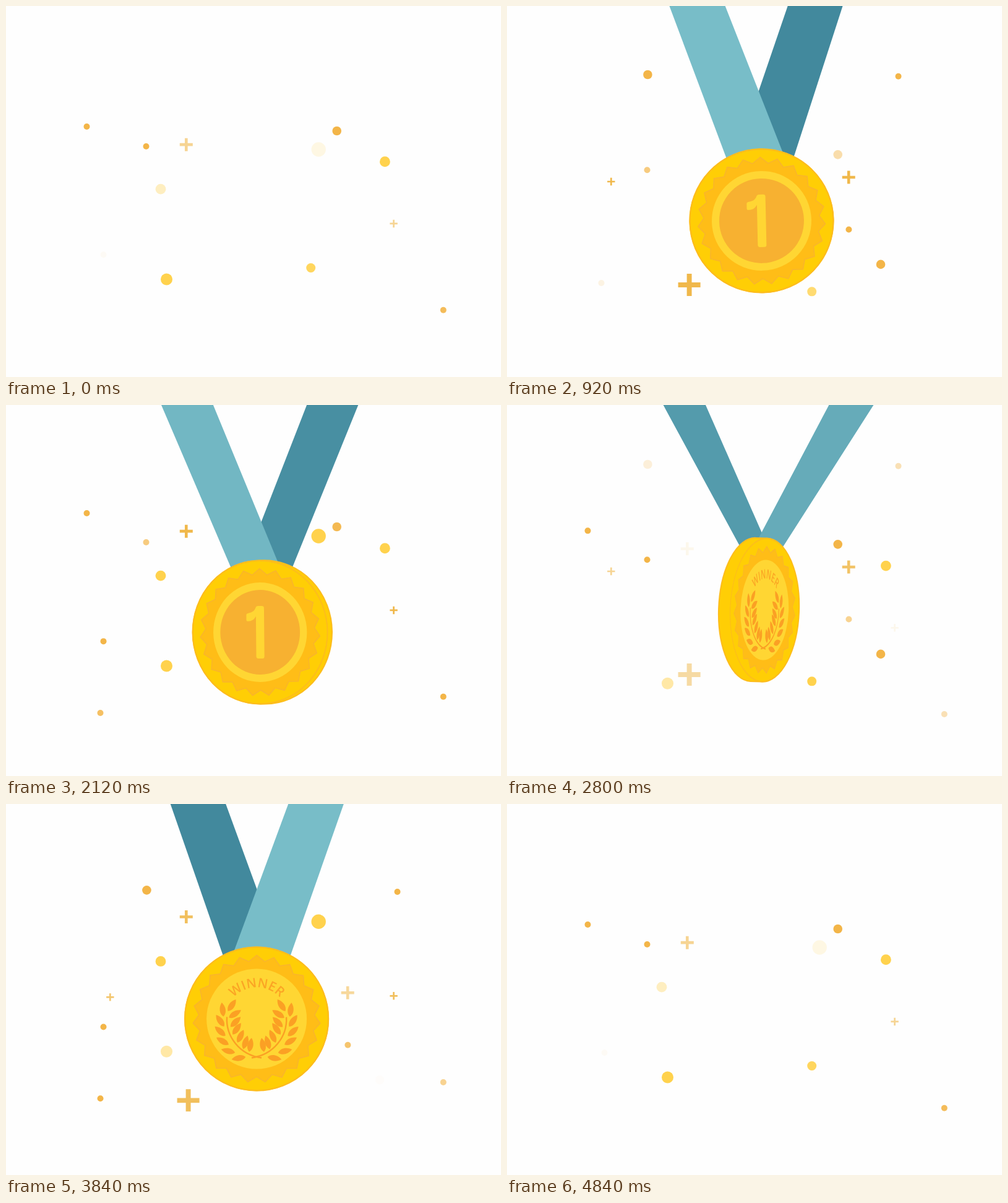
Animation of 800x600 px, one loop 4.88 s. Source, as an HTML page:

```html
<!DOCTYPE html>
<html lang="en">
<head>
<meta charset="utf-8">
<title>Winner medal</title>
<style>
  html, body { margin: 0; width: 100%; height: 100%; overflow: hidden; background: #fefefe; }
  svg { display: block; width: 100%; height: 100%; }
  text { font: 600 21px "Open Sans", "Noto Sans", sans-serif; fill: #fba524; text-anchor: middle; }
</style>
</head>
<body>
<svg viewBox="0 0 800 600">
  <defs>
    <path id="arc" d="M-51 0A51 51 0 0 1 51 0"/>
    <path id="leaf" d="M-11.5 0C-6-6.5 4-6 11.5 0C4 6-6 6.5-11.5 0Z"/>
  </defs>
  <g id="sparks"></g>
  <g id="medal">
    <g id="ribbons"><path id="left"/><path id="right"/></g>
    <path id="rim" fill="#ffce05" stroke="#fdbd1c" stroke-width="2.2"/>
    <g id="front">
      <circle r="80.5" fill="#ffd633"/>
      <circle r="68.5" fill="#f7b131"/>
      <path fill="#ffd633" d="M-7-26C-10-20-15-18-20-18Q-23.5-17.500-23.500-20V-28Q-23.500-30.500-20-31
        C-13-32-9-35-7.500-39.500Q-6.500-42.500-3-42.500H3Q7-42.500 7-39V39Q7 42.500 3.500 42.500H-3.500Q-7 42.500-7 39Z"/>
    </g>
    <g id="back">
      <circle r="81" fill="#ffd633"/>
      <text><textPath href="#arc" startOffset="50%">WINNER</textPath></text>
      <g id="wreath" fill="#fba024"></g>
    </g>
  </g>
</svg>
<script>
const NS = "http://www.w3.org/2000/svg";
const $ = id => document.getElementById(id);
const set = (el, attrs) => {
  for (const k in attrs) el.setAttribute(k, attrs[k]);
  return el;
};
const add = (parent, tag, attrs) => parent.appendChild(set(document.createElementNS(NS, tag), attrs));

const LOOP = 4880, STEP = 40, CYCLE = 4840, REPEAT = 2240;
const LIFE = 1600, FADE = 400;
const ORANGE = "#f3b548", YELLOW = "#ffd24d";

// Dots: x, y at birth, birth time, radius
const orangeDots = [
  [130.5, 156.7, 1680, 5], [226.5, 210.3, -400, 5], [534.7, 181.2, -500, 7.3],
  [157.5, 336.3, 1020, 5], [706.8, 440, 1360, 5], [152.5, 445.5, 860, 5],
  [227.4, 92.7, 480, 7.3], [632.5, 92, 400, 5], [552.4, 336.5, 320, 5], [604, 380, 10, 7.3]
];
const yellowDots = [
  [612.4, 213.4, 1680, 8.4], [505.2, 167.8, 1060, 11.7], [250, 235.3, 1140, 8.4],
  [259.5, 392, 1400, 9.5], [492.7, 408.5, -360, 7.5]
];
// Crosses: x, y at birth, birth time, half length
const crosses = [
  [291.3, 167.5, 1240, 10.5], [626.6, 295.3, 1240, 6.2], [168.3, 259, 320, 6.2],
  [552.2, 247.8, 220, 10.5], [294.6, 427.7, 360, 18]
];

const sparks = [];
const addDots = (list, fill) => list.forEach(([x, y, born, r]) =>
  sparks.push({ x, y, born, el: add($("sparks"), "circle", { r, fill }) }));
addDots(orangeDots, ORANGE);
addDots(yellowDots, YELLOW);
crosses.forEach(([x, y, born, h]) => sparks.push({ x, y, born, el: add($("sparks"), "path", {
  d: `M${-h} 0H${h}M0 ${-h}V${h}`, fill: "none", stroke: "#f0b84b", "stroke-width": h * 0.44
}) }));

// Shared disc and toothed seal under each face's own artwork
const TEETH = 23;
const seal = Array.from({ length: TEETH * 2 }, (_, i) => {
  const a = i * Math.PI / TEETH, r = i % 2 ? 93.5 : 103;
  return (r * Math.sin(a)).toFixed(2) + "," + (-r * Math.cos(a)).toFixed(2);
}).join(" ");
for (const id of ["front", "back"]) {
  const face = $(id), first = face.firstElementChild;
  const disc = add(face, "circle", { r: 115.8, fill: "#ffce05", stroke: "#fdbd1c", "stroke-width": 2.2 });
  const star = add(face, "polygon", { points: seal, fill: "#ffbd17", stroke: "#f9b52c", "stroke-width": 1.6 });
  face.insertBefore(disc, first);
  face.insertBefore(star, first);
}

// Leaves of the left branch: x, y, direction of the tip
const leaves = [
  [-55, -15, -97], [-59, 3, -125], [-59, 20, -138], [-55, 36, -150], [-46, 52, -167], [-29, 63.5, 170],
  [-40, -22, -56], [-35, -8, -32], [-34, 5, -45], [-32, 16, -54], [-26, 28, -64], [-18, 38, -72], [-10, 42, -80]
];
for (const side of [1, -1]) {
  const branch = add($("wreath"), "g", { transform: `scale(${side} 1)` });
  add(branch, "path", { d: "M-48-3C-50 28-28 58 8 63", fill: "none", stroke: "#fba024", "stroke-width": 2.4 });
  leaves.forEach(([x, y, a]) => add(branch, "use", { href: "#leaf", transform: `translate(${x} ${y}) rotate(${a})` }));
}

const clamp = v => Math.min(1, Math.max(0, v));
const mix = (a, b, k) => a + (b - a) * k;
const wave = k => (1 - Math.cos(Math.PI * k)) / 2;
const easeOut = k => 1 - (1 - k) ** 3;
const easeIn = k => k ** 3;

// Pose: time, pivot x, drop, tilt, easing towards the next pose
const poses = [
  [0, 882, -420, -50, easeOut],
  [520, 402, 0, 4, wave],
  [920, 402, 0, -1.3, wave],
  [1560, 402, 0, 1.35, wave],
  [1740, 403, 0, 1, wave],
  [2120, 410.3, 20, -0.55, wave],
  [2800, 422, -16, 2.05, wave],
  [3320, 408, 3, -0.6, wave],
  [3840, 405.8, 0, 0.1, wave],
  [4380, 403, 0, -0.6, easeIn],
  [4840, -78, -420, 50, easeIn]
];
const PIVOT_Y = -70, MEDAL_Y = 347.5, R = 116;

function poseAt(t) {
  let i = 0;
  while (i < poses.length - 2 && t >= poses[i + 1][0]) i++;
  const a = poses[i], b = poses[i + 1];
  const k = a[4](clamp((t - a[0]) / (b[0] - a[0])));
  return [1, 2, 3].map(n => mix(a[n], b[n], k));
}

const LIGHT = [120, 189, 200], DARK = [66, 137, 157];
const blend = k => `rgb(${LIGHT.map((c, i) => Math.round(mix(c, DARK[i], k)))})`;

function drawRibbons(s, turn) {
  const grow = (base, a, b) => base + a * s + b * s * s;
  const inner = y => grow(50.5, 40.6, 27.6) - grow(0.367, 0.075, 0.066) * y;
  const outer = y => grow(140, 23.2, 24.5) - grow(0.349, 0.149, 0.142) * y;
  const top = -400, end = 245;
  const strip = side => [[outer, top], [inner, top], [inner, end], [outer, end]]
    .map(([edge, y], i) => (i ? "L" : "M") + (side * edge(y)).toFixed(2) + " " + y).join("") + "Z";
  set($("left"), { d: strip(-1), fill: blend(turn) });
  set($("right"), { d: strip(1), fill: blend(1 - turn) });
  const upper = turn < 0.5 ? $("left") : $("right");
  if ($("ribbons").lastElementChild !== upper) $("ribbons").append(upper);
}

function drawMedal(t) {
  const [x, drop, tilt] = poseAt(t);
  const turn = wave(clamp((t - 1740) / 1757));
  const yaw = turn * Math.PI;
  const s = Math.sin(yaw), c = Math.abs(Math.cos(yaw));
  const h = 10.5 * s, rx = Math.max(0.5, R * c);
  set($("medal"), { transform: `translate(${x} ${drop}) rotate(${tilt} 0 ${PIVOT_Y})` });
  drawRibbons(s, turn);
  set($("rim"), {
    transform: `translate(0 ${MEDAL_Y})`,
    d: `M${-h} ${-R}H${h}A${rx} ${R} 0 0 1 ${h} ${R}H${-h}A${rx} ${R} 0 0 1 ${-h} ${-R}Z`
  });
  const isFront = turn < 0.5;
  const place = (id, dx, on) => set($(id), {
    transform: `translate(${dx} ${MEDAL_Y}) scale(${Math.max(c, 0.004)} 1)`,
    display: on ? "inline" : "none"
  });
  place("front", -h, isFront);
  place("back", h, !isFront);
}

function drawSparks(t) {
  for (const { x, y, born, el } of sparks) {
    let age = (t - born + CYCLE) % CYCLE;
    if (age >= REPEAT) age -= REPEAT;
    set(el, {
      transform: `translate(${x} ${y + age / 24})`,
      opacity: clamp(Math.min(age, LIFE - age) / FADE)
    });
  }
}

const start = performance.now();
function frame() {
  const elapsed = Math.max(0, performance.now() - start) % LOOP;
  const t = Math.floor(elapsed / STEP) * STEP;
  drawSparks(t);
  drawMedal(t);
  requestAnimationFrame(frame);
}
frame();
</script>
</body>
</html>
```
